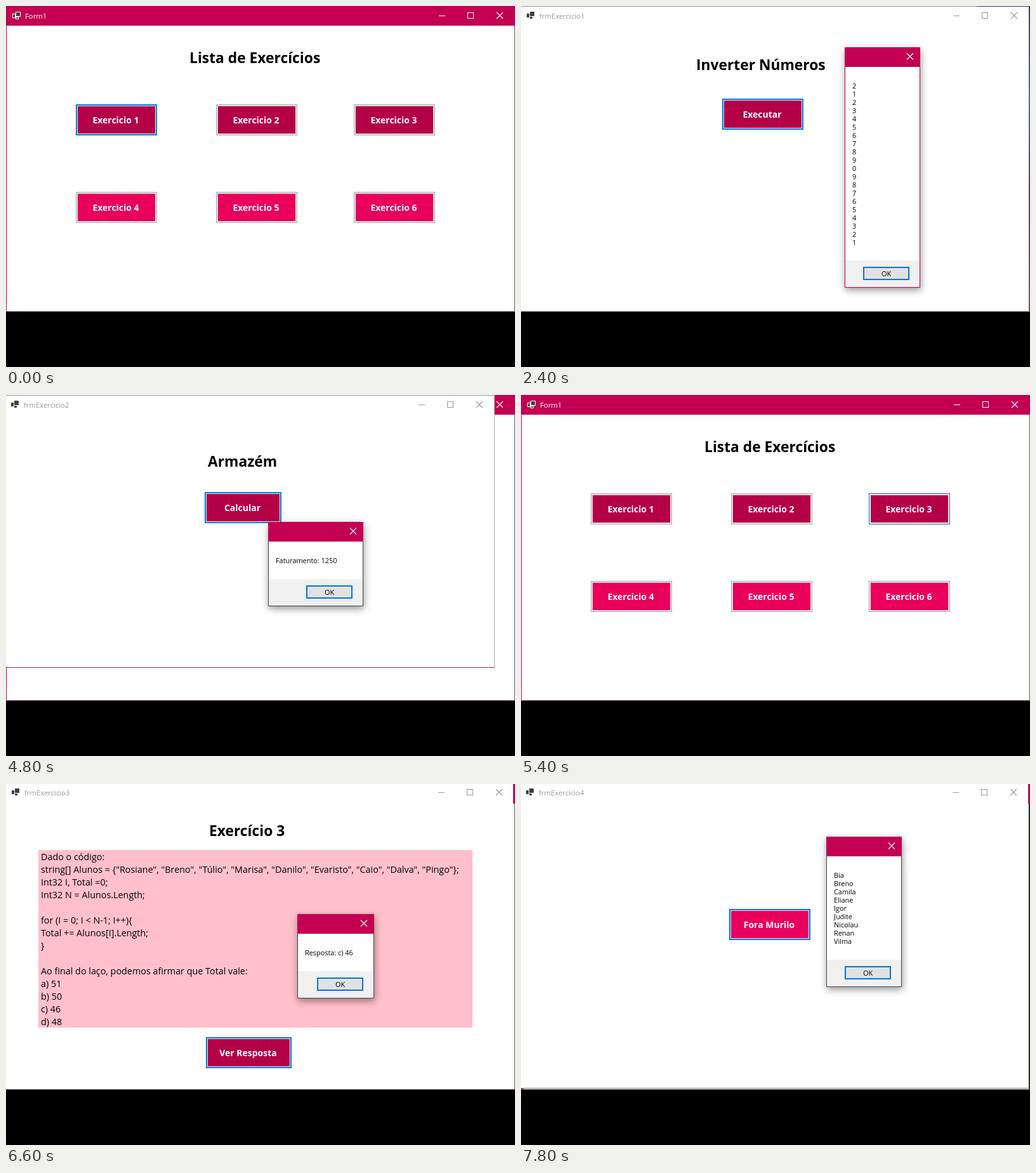
An HTML page that plays this animation: 802 by 569 pixels, repeating every 8 s.

```html
<!DOCTYPE html>
<html lang="pt">
<head>
<meta charset="utf-8">
<style>
  html, body { margin: 0; width: 100%; height: 100%; overflow: hidden; background: #000; }
  svg { display: block; font-family: "Open Sans", "Noto Sans", sans-serif; }
  rect { shape-rendering: crispEdges; }
  .shadow { filter: drop-shadow(1px 4px 6px rgba(0, 0, 0, .42)); }
</style>
</head>
<body>
<svg id="stage" width="802" height="569" viewBox="0 0 802 569"></svg>
<script>
const PINK = '#c30052', DARK = '#b40047', BRIGHT = '#e8005c', BLUE = '#0078d7';

const rect = (x, y, w, h, fill, extra = '') =>
  `<rect x="${x}" y="${y}" width="${w}" height="${h}" fill="${fill}" ${extra}/>`;
const framed = (x, y, w, h, border, fill, b = 1) =>
  rect(x, y, w, h, border) + rect(x + b, y + b, w - 2 * b, h - 2 * b, fill);
const text = (x, y, str, size = 11.3, fill = '#000', extra = '') =>
  `<text x="${x}" y="${y}" font-size="${size}" fill="${fill}" ${extra}>${str.replace(/</g, '&lt;')}</text>`;
const centered = (x, y, str, size, fill, weight = 400) =>
  text(x, y, str, size, fill, `text-anchor="middle" font-weight="${weight}"`);
const heading = (x, y, str) => text(x, y, str, 22.8, '#000', 'font-weight="700"');
const cross = (x, y, color) =>
  `<path d="M${x - 5} ${y - 5}l10 10m0-10l-10 10" stroke="${color}" stroke-width="1.1"/>`;

function formIcon(x, y, active) {
  const line = active ? 'stroke="#fff"' : '';
  const at = active ? .5 : 0;
  return rect(x + 5 + at, y + at, 7, 7, '#404040', line) +
    rect(x + at, y + 3 + at, 4, 6, '#404040', line) +
    rect(x + 5 + at, y + 8 + at, 4, 3, '#404040', line);
}

// Window chrome; dx and dy shift the caption contents.
function form(w, h, title, active, dx = 0, dy = 0) {
  const ink = active ? '#fff' : '#999', y = 15 + dy;
  let s = rect(0, 0, w, h, '#fff');
  if (active) {
    s += rect(0, 0, w, 31, PINK) + rect(0, 31, 1, h - 31, PINK) +
      rect(w - 1, 31, 1, h - 31, '#555') + rect(0, h - 1, w, 1, '#8b5066');
  } else if (!dy) s += rect(0, 0, w, 1, '#999');
  return s + formIcon(10 + dx, 9 + dy, active) + text(30 + dx, 20 + dy, title, 11.3, ink) +
    rect(w - 120, y, 10, 1, ink) +
    rect(w - 74.5, y - 4.5, 9, 9, 'none', `stroke="${ink}"`) + cross(w - 24, y, ink);
}

function bigButton(x, y, w, label, fill, state = '') {
  const focus = state === 'focus', hover = state === 'hover';
  const h = 49;
  return framed(x, y, w, h, focus ? BLUE : hover ? '#35618a' : '#adadad',
      focus || hover ? '#e5f1fb' : '#e1e1e1', focus ? 2 : 1) +
    (hover ? rect(x, y, 1, h, BLUE) : '') +
    rect(x + 3, y + 3, w - 6, h - 6, fill) +
    centered(x + w / 2 - 1, y + 30, label, 14, '#fff', 700);
}

function smallButton(x, y, w, h, label, state, size) {
  const look = { focus: [BLUE, '#e1e1e1', 2], hover: [BLUE, '#e5f1fb', 1], '': ['#adadad', '#e1e1e1', 1] }[state];
  return framed(x, y, w, h, ...look) + centered(x + w / 2, y + h / 2 + 4.5, label, size);
}

function popup(x, y, w, h, border, fill) {
  return `<g class="shadow">${rect(x, y, w, h, border)}</g>` +
    rect(x + 1, y + 1, w - 2, h - 2, fill) + rect(x, y, w, 31, PINK) + cross(x + w - 16, y + 14.5, '#fff');
}

function inputBox(x, y, title, prompt, value, okState) {
  const caret = x + 17 + value.length * 6.4;
  return rect(x - 12, y - 11, 483, 218, '#f9f9f9', 'rx="16"') +
    popup(x, y, 454, 189, PINK, '#f0f0f0') +
    text(x + 9, y + 20, title, 11.3, '#fff') + text(x + 17, y + 56, prompt) +
    smallButton(x + 373, y + 48, 75, 27, 'OK', okState, 11.3) +
    smallButton(x + 373, y + 84, 75, 27, 'Cancelar', '', 11.3) +
    framed(x + 14, y + 149, 429, 23, BLUE, '#fff') +
    text(x + 17, y + 164, value) + rect(Math.round(caret), y + 152, 1, 15, '#000');
}

function messageBox(x, y, w, h, lines, border = '#444') {
  return popup(x, y, w, h, border, '#fff') + rect(x + 1, y + h - 43, w - 2, 42, '#f0f0f0') +
    lines.map((line, i) => text(x + 12, y + 64.5 + i * 13, line, 10.9)).join('') +
    smallButton(x + w - 90, y + h - 33, 73, 21, 'OK', 'focus', 10.9);
}

function menu(selected, state = 'focus') {
  let s = form(802, 482, 'Form1', true) + heading(289, 90, 'Lista de Exercícios');
  for (let i = 0; i < 6; i++)
    s += bigButton([110, 331, 548][i % 3], i < 3 ? 155 : 293, 128, 'Exercicio ' + (i + 1),
      i < 3 ? DARK : BRIGHT, i + 1 === selected ? state : '');
  return s;
}

function invert(active) {
  const dx = active ? 1 : 0;
  const edge = active ? '' : rect(800, 0, 2, 482, 'url(#desk)') + rect(718, 0, 84, 1, '#3d2f4d') +
    rect(0, 481, 802, 1, '#777');
  return form(active ? 802 : 801, 482, 'frmExercicio1', active, dx - 1 + (active ? 0 : 0)) + edge +
    heading(276 + dx, 101, 'Inverter Números') +
    bigButton(317 + dx, 146, 128, 'Executar', DARK, 'focus');
}

const warehouse = () => menu(2) + rect(1, 31, 800, 450, '#fff') +
  form(770, 430, 'frmExercicio2', false, -2) +
  rect(769, 0, 1, 430, '#aaa') + rect(0, 429, 770, 1, '#8f3055') +
  heading(318, 113, 'Armazém') + bigButton(313, 153, 121, 'Calcular', DARK, 'focus');

const quiz = `Dado o código:
string[] Alunos = {"Rosiane", "Breno", "Túlio", "Marisa", "Danilo", "Evaristo", "Caio", "Dalva", "Pingo"};
Int32 I, Total =0;
Int32 N = Alunos.Length;

for (I = 0; I < N-1; I++){
Total += Alunos[I].Length;
}

Ao final do laço, podemos afirmar que Total vale:
a) 51
b) 50
c) 46
d) 48`.split('\n');

// Full-size inactive forms leave a sliver of the menu at the right edge.
const sliver = () => rect(799, 0, 3, 31, PINK) + rect(801, 31, 1, 451, '#555') + rect(0, 481, 802, 1, '#555');

function question(active) {
  const body = heading(320, 82, 'Exercício 3') + rect(51, 104, 684, 280, '#ffc0cb') +
    quiz.map((line, i) => text(55, 120 + i * 20, line, 14.35)).join('') +
    bigButton(315, 399, 135, 'Ver Resposta', DARK, 'focus');
  return active
    ? form(802, 482, 'frmExercicio3', true) + `<g transform="translate(1 2)">${body}</g>`
    : form(801, 482, 'frmExercicio3', false, -1, -2) + sliver() + body;
}

const filter = () => form(800, 482, 'frmExercicio4', false, -2, -2) + sliver() +
  rect(0, 479, 799, 1, '#6f7f7f') + rect(0, 480, 4, 1, PINK) +
  bigButton(328, 197, 128, 'Fora Murilo', BRIGHT, 'focus');

const askNumber = (n, value, state) =>
  inputBox(231, 201, 'Entrada de Dados', 'Digite um número para a posição: ' + n, value, state);
const askAmount = (n, value) =>
  inputBox(150, 214, 'Quantidade', 'Quantidade vendida do produto: ' + n, value, 'focus');
const people = ['Bia', 'Breno', 'Camila', 'Eliane', 'Igor', 'Judite', 'Nicolau', 'Renan', 'Vilma'];

const scenes = [
  () => menu(1),
  () => invert(true),
  () => invert(false) + askNumber(1, '', 'hover'),
  () => invert(false) + askNumber(11, '9', 'focus'),
  () => invert(false) + messageBox(510, 65, 119, 379, [...'21234567890987654321'], PINK),
  () => menu(2),
  () => warehouse() + askAmount(1, '10'),
  () => warehouse() + askAmount(7, '15'),
  () => warehouse() + messageBox(413, 200, 150, 133, ['Faturamento: 1250']),
  () => menu(3, 'hover'),
  () => question(true),
  () => question(false) + messageBox(459, 205, 121, 133, ['Resposta: c) 46']),
  () => menu(4),
  () => filter() + messageBox(481, 83, 119, 237, people),
];

const defs = `<defs><linearGradient id="desk" x2="0" y2="1"><stop stop-color="#4a3a5c"/>
  <stop offset=".3" stop-color="#56708f"/><stop offset=".6" stop-color="#5c3f66"/>
  <stop offset="1" stop-color="#7d5078"/></linearGradient></defs>`;
const stage = document.getElementById('stage');
let shown = -1;

function draw() {
  const index = Math.floor(performance.now() % 8000 / 600);
  if (index !== shown) stage.innerHTML = defs + scenes[shown = index]();
  requestAnimationFrame(draw);
}
draw();
</script>
</body>
</html>
```
